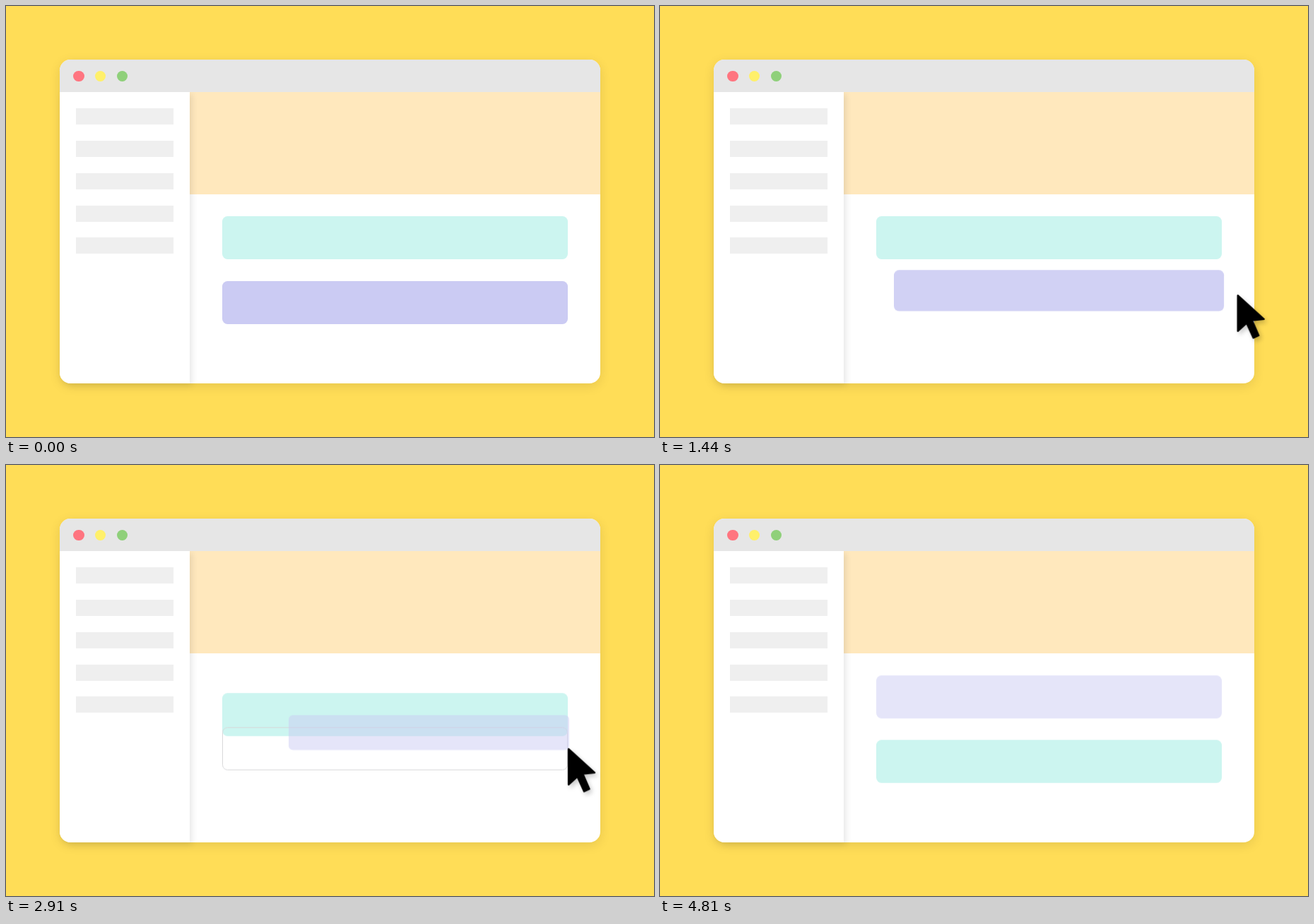
An HTML page that plays this animation: 917 px wide and 611 px high, repeating every 5940 ms.

```html
<!DOCTYPE html>
<html lang="en">
<head>
<meta charset="utf-8">
<title>Drag to reorder</title>
<style>
  :root {
    --loop: 5940ms;
    --soft: cubic-bezier(.3, .25, .7, .75);
  }
  html, body { margin: 0; width: 100%; height: 100%; overflow: hidden; background: #ffdd57; }
  .stage { position: relative; width: 917px; height: 611px; overflow: hidden; }
  .stage div, .stage svg { position: absolute; box-sizing: border-box; }

  .window {
    left: 76.4px; top: 76.4px; width: 764.2px; height: 458.4px;
    border-radius: 15.3px; background: #fff;
    box-shadow: 0 4px 16px rgba(0, 0, 0, .1);
  }
  .hero { left: 183.4px; top: 45.8px; width: 580.8px; height: 145.2px; background: #ffe8bd; }
  .sidebar {
    left: 0; top: 45.8px; width: 183.4px; height: 412.6px;
    background: #fff; border-bottom-left-radius: 15.3px;
    box-shadow: 3px 3px 10px rgba(0, 0, 0, .1);
  }
  .sidebar div {
    left: 22.9px; top: calc(22.9px + var(--i) * 45.85px);
    width: 137.6px; height: 22.9px; background: #efefef;
  }
  .titlebar {
    left: 0; top: 0; width: 100%; height: 45.8px;
    background: #e6e6e6; border-radius: 15.3px 15.3px 0 0;
  }
  .titlebar div {
    left: calc(19.1px + var(--i) * 30.6px); top: 15.3px;
    width: 15.3px; height: 15.3px; border-radius: 50%;
  }

  .block, .slot {
    left: 305.6px; top: 298px; width: 489.1px; height: 61.1px; border-radius: 7.6px;
  }
  .teal { background: #ccf5f0; animation: swap var(--loop) infinite; }
  .purple {
    top: 389.7px; background: #cbcbf3; transform-origin: 100% 100%;
    animation: drag var(--loop) var(--soft) infinite;
  }
  .slot { border: 1.5px solid #d8d8da; animation: slot var(--loop) infinite; }
  .hover { animation: hover var(--loop) step-end infinite; }
  .outline {
    left: 279px; top: 374.4px; width: 542.4px; height: 91.7px;
    border: 1.5px solid #dcdcdc; border-radius: 7.6px;
  }
  .handle {
    left: 805.4px; top: 404.9px; width: 30.6px; height: 30.6px;
    border-radius: 7.6px; background: #fff;
    box-shadow: 0 0 6px rgba(0, 0, 0, .2);
    animation: grow var(--loop) ease infinite;
  }
  .handle svg { left: 3.4px; top: 3.1px; width: 24.4px; height: 24.4px; }
  .cursor {
    left: 0; top: 0; width: 42px; height: 66px; overflow: visible;
    filter: drop-shadow(3px 4px 3px rgba(0, 0, 0, .2));
    animation: cursor var(--loop) var(--soft) infinite;
  }

  @keyframes cursor {
    0% { transform: translate(918px, 612px); }
    8.59% { transform: translate(730px, 408px); }
    12.63% { transform: translate(730px, 408px); animation-timing-function: linear; }
    14.8% { transform: translate(752.5px, 421.6px); animation-timing-function: linear; }
    16.67% { transform: translate(775px, 428.3px); animation-timing-function: linear; }
    18.55% { transform: translate(797.5px, 428.1px); animation-timing-function: linear; }
    20.71%, 22.73% { transform: translate(820px, 421px); }
    28.79%, 34.51% { transform: translate(806px, 371px); }
    40.57%, 44.95% { transform: translate(801px, 339px); }
    52.53%, 57.58% { transform: translate(790px, 455px); }
    64.14% { transform: translate(772px, 343px); }
    72.22% { transform: translate(772px, 343px); animation-timing-function: linear; }
    78.7% { transform: translate(879px, 374px); animation-timing-function: linear; }
    80.98%, 100% { transform: translate(921px, 378px); }
  }
  @keyframes drag {
    0%, 22.73% { transform: none; opacity: 1; }
    28.79%, 34.51% { transform: translate(12.9px, -77.3px) scale(.812); opacity: .5; }
    40.57%, 44.95% { transform: translate(7.9px, -109.3px) scale(.812); }
    52.53%, 57.58% { transform: translate(-3.1px, 6.7px) scale(.812); }
    64.14%, 68.18% { transform: translate(-21.1px, -105.3px) scale(.812); }
    72.22%, 100% { transform: translate(0, -91.7px); opacity: .5; }
  }
  @keyframes swap {
    0%, 36.8% { transform: none; }
    40%, 47.5% { transform: translateY(91.7px); }
    51%, 59.3% { transform: none; }
    62.8%, 100% { transform: translateY(91.7px); }
  }
  @keyframes slot {
    0%, 41.08% { opacity: 0; transform: none; }
    42.59% { opacity: 1; }
    47.5% { transform: none; }
    51%, 59.3% { transform: translateY(101.8px); }
    62.8% { transform: none; }
    71.7% { opacity: 1; }
    72.22%, 100% { opacity: 0; transform: none; }
  }
  @keyframes hover {
    0% { visibility: hidden; }
    9.6% { visibility: visible; }
    23.2%, 100% { visibility: hidden; }
  }
  @keyframes grow {
    0%, 19.7% { transform: none; }
    22.7%, 100% { transform: scale(1.4); }
  }
</style>
</head>
<body>
<div class="stage">
  <div class="window">
    <div class="hero"></div>
    <div class="sidebar">
      <div style="--i:0"></div>
      <div style="--i:1"></div>
      <div style="--i:2"></div>
      <div style="--i:3"></div>
      <div style="--i:4"></div>
    </div>
    <div class="titlebar">
      <div style="--i:0; background:#ff7580"></div>
      <div style="--i:1; background:#fff06a"></div>
      <div style="--i:2; background:#8fd07a"></div>
    </div>
  </div>

  <div class="block teal"></div>
  <div class="slot"></div>
  <div class="hover"><div class="outline"></div></div>
  <div class="block purple"></div>
  <div class="hover">
    <div class="handle">
      <svg viewBox="0 0 24 24">
        <path d="M6 7h2.5L5 3.5 1.5 7H4v10H1.5L5 20.5 8.5 17H6zM10 5v2h12V5zM10 11v2h12v-2zM10 17v2h12v-2z"/>
      </svg>
    </div>
  </div>
  <svg class="cursor" viewBox="0 0 42 66">
    <path d="M1 1.2L38 34.8 21.3 36.6 30.5 58 23 61.4 13.5 40.4 1 51.8z"
          stroke="#000" stroke-width="2.4" stroke-linejoin="round"/>
  </svg>
</div>
</body>
</html>
```
